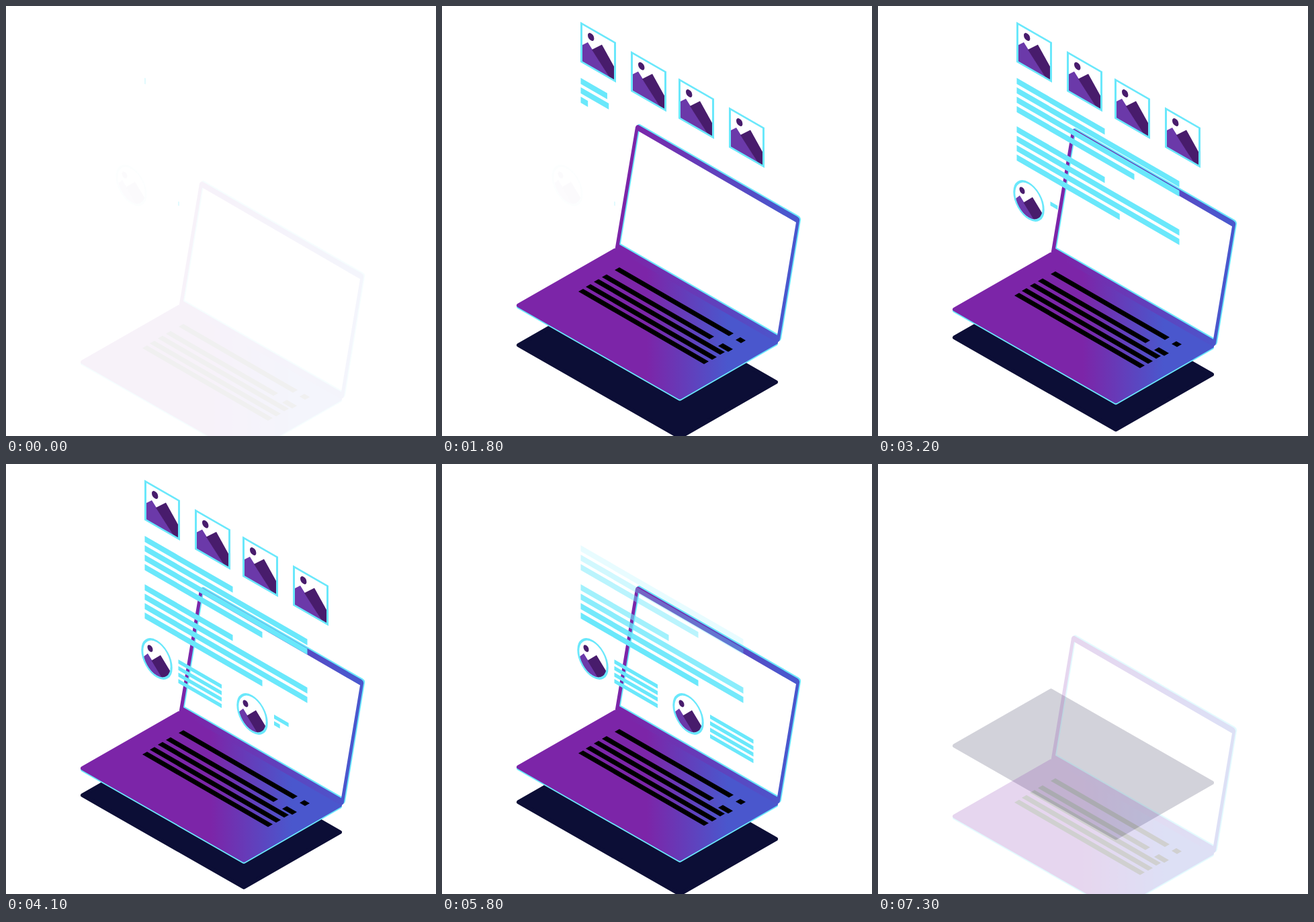
Animation of 640 by 640 pixels, one loop 7.4 s. Source, as an HTML page:

```html
<!DOCTYPE html>
<html lang="en">
<head>
<meta charset="utf-8">
<title>Laptop page builder</title>
<style>
  html, body { margin: 0; width: 100%; height: 100%; overflow: hidden; background: #fff; }
  svg { display: block; width: 100%; height: 100%; }
</style>
</head>
<body>
<svg id="stage" viewBox="0 0 640 640">
  <defs>
    <linearGradient id="baseFill" gradientUnits="userSpaceOnUse" x1="305" x2="425" y1="0" y2="0">
      <stop stop-color="#7c25a8"/><stop offset="1" stop-color="#4a57cd"/>
    </linearGradient>
    <linearGradient id="frameFill" gradientUnits="userSpaceOnUse" x1="280" x2="510" y1="0" y2="0">
      <stop stop-color="#7c25a8"/><stop offset="1" stop-color="#4a57cd"/>
    </linearGradient>
    <path id="slab" stroke-width="6" stroke-linejoin="round" d="M114 .5L257.5 -81.5L497 55.5L354 137.5Z"/>
    <path id="frame" fill-rule="evenodd" d="M258 364L288 185Q290 180 294 183L529 318.500Q533 321 532 325L503 501Q502 506 497 505L268 373Q257 369 258 364Z
      M292 191L264 360L499 495L527 327Z"/>
    <clipPath id="round"><ellipse rx="21" ry="25" transform="matrix(1 .577 0 1 0 0)"/></clipPath>
    <g id="card">
      <path fill="#6b39a9" d="M3 35L11 31L44 84L3 60Z"/>
      <path fill="#481c6c" d="M17 42L32 34.500L50 67V87L43 83Z"/>
      <g transform="matrix(1 .577 0 1 0 0)">
        <ellipse cx="15.700" cy="14" rx="4.700" ry="5.300" fill="#481c6c"/>
        <rect x="1.500" y="2" width="50" height="57" fill="none" stroke="#6ae8fb" stroke-width="3"/>
      </g>
    </g>
    <g id="avatar">
      <g clip-path="url(#round)">
        <path fill="#6b39a9" d="M-24 0L-13.500 -8L10 30L-24 30Z"/>
        <path fill="#481c6c" d="M-8 2.500L5.500 -5.500L24 25V34H11Z"/>
      </g>
      <g transform="matrix(1 .577 0 1 0 0)">
        <ellipse cx="-10" cy="-9.700" rx="4" ry="4.700" fill="#481c6c"/>
        <ellipse rx="21.700" ry="26.300" fill="none" stroke="#6ae8fb" stroke-width="3"/>
      </g>
    </g>
  </defs>
  <g id="shadow"><use href="#slab" fill="#0c0e36" stroke="#0c0e36"/></g>
  <g id="laptop">
    <use href="#frame" x="2" y="-1.300" fill="#6ae8fb"/>
    <use href="#slab" y="452" fill="#6ae8fb" stroke="#6ae8fb"/>
    <g transform="translate(0 450)"><use href="#slab" fill="url(#baseFill)" stroke="url(#baseFill)"/></g>
    <use href="#frame" fill="url(#frameFill)"/>
    <path id="keys"/>
  </g>
</svg>
<script>
const LOOP = 7400, SLOPE = 0.577;
const stage = document.getElementById('stage');
const shadow = document.getElementById('shadow');
const laptop = document.getElementById('laptop');

const clamp = v => Math.max(0, Math.min(1, v));
const progress = (t, start, duration) => clamp((t - start) / duration);
const easeInOut = p => (1 - Math.cos(Math.PI * p)) / 2;
const easeOut = p => Math.sin(p * Math.PI / 2);

function add(tag, attributes) {
  const node = document.createElementNS('http://www.w3.org/2000/svg', tag);
  for (const name in attributes) node.setAttribute(name, attributes[name]);
  return stage.appendChild(node);
}

function place(node, x, y, opacity) {
  node.setAttribute('transform', `translate(${x} ${y})`);
  node.setAttribute('opacity', opacity);
}

// Keyboard rows: x, y, length
document.getElementById('keys').setAttribute('d', [
  [257, 398, 170], [238, 408.5, 160], [226, 415.5, 188], [214, 423, 188],
  [203, 430, 187], [411, 511, 15], [437, 502, 8]
].map(([x, y, length]) => `M${x} ${y}l7 -4l${length} ${length * SLOPE}l-7 4Z`).join(''));

// Each part: position, entry start, fade start
const parts = [];
function addSlider(shape, x, y, start, end, dx, dy, idle = 0) {
  parts.push({ node: add('use', { href: '#' + shape }), x, y, start, end, fade: 420, dx, dy, idle });
}
function addLine(x, y, length, height, start, end, grow, idle = 0) {
  const node = add('path', { fill: '#6ae8fb' });
  parts.push({ node, x, y, length, height, start, end, fade: 450, grow, idle });
}

[[206, 23], [281, 66.5], [352, 107], [427, 150]].forEach(([x, y], i) =>
  addSlider('card', x, y, 295 + 360 * i, 4960 + 100 * i, -34, -25));

[131, 242, 242, 175].forEach((length, i) => {
  for (const block of [0, 1]) {
    const order = block * 4 + i;
    addLine(206.5, 107 + 72 * block + 14 * i, length, 9, 1515 + 122 * order, 5350 + 70 * order, 950, order ? 0 : 0.4);
  }
});

for (const k of [0, 1]) {
  addSlider('avatar', 224.5 + 142 * k, 290 + 82 * k, 2700 + 850 * k, 5980 + 520 * k, -38, -23, k ? 0 : 0.015);
  for (let i = 0; i < 4; i++)
    addLine(256.5 + 142.5 * k, 291 + 82 * k + 9.7 * i, 64.5, 6, 3100 + 800 * k + 120 * i, 6145 + 220 * k, 600, k || i ? 0 : 0.4);
}

const LAPTOP_PATH = [[-25, 80], [435, 0.5], [1900, -5], [3700, 2.3], [4800, 2.3], [6400, -0.3], [6940, 0], [7380, 80], [LOOP, 80]];
function follow(path, t) {
  const i = path.findIndex(key => key[0] > t);
  const [t0, y0] = path[i - 1], [t1, y1] = path[i];
  return y0 + (y1 - y0) * easeInOut((t - t0) / (t1 - t0));
}

function drawPart(part, t) {
  const { node, x, y, start, end } = part;
  const waiting = t < start;
  const opacity = 1 - progress(t, end, part.fade);
  if (part.length) {
    const width = waiting ? 1 : part.length * progress(t, start, part.grow);
    const rise = width * SLOPE;
    node.setAttribute('d', `M0 0L${width} ${rise}v${part.height}L0 ${part.height}Z`);
    place(node, x, y, waiting ? part.idle : opacity);
  } else {
    const p = progress(t, start, 400), rest = 1 - easeOut(p);
    place(node, x + part.dx * rest, y + part.dy * rest, Math.max(p, part.idle) * opacity);
  }
}

function render(now) {
  const t = now % LOOP;
  const leave = progress(t, 6940, 440);
  place(laptop, 0, follow(LAPTOP_PATH, t), progress(t, -25, 460) * (1 - leave));

  const enter = progress(t, 60, 440);
  const hover = 497.5 + 7 * Math.cos(2 * Math.PI * (t - 1950) / 3450);
  const lift = 78 * (1 - easeInOut(enter) + easeInOut(leave));
  place(shadow, 0, hover - lift, enter * (1 - leave));

  for (const part of parts) drawPart(part, t);
  requestAnimationFrame(() => render(performance.now() - began));
}

const began = performance.now();
render(0);
</script>
</body>
</html>
```
